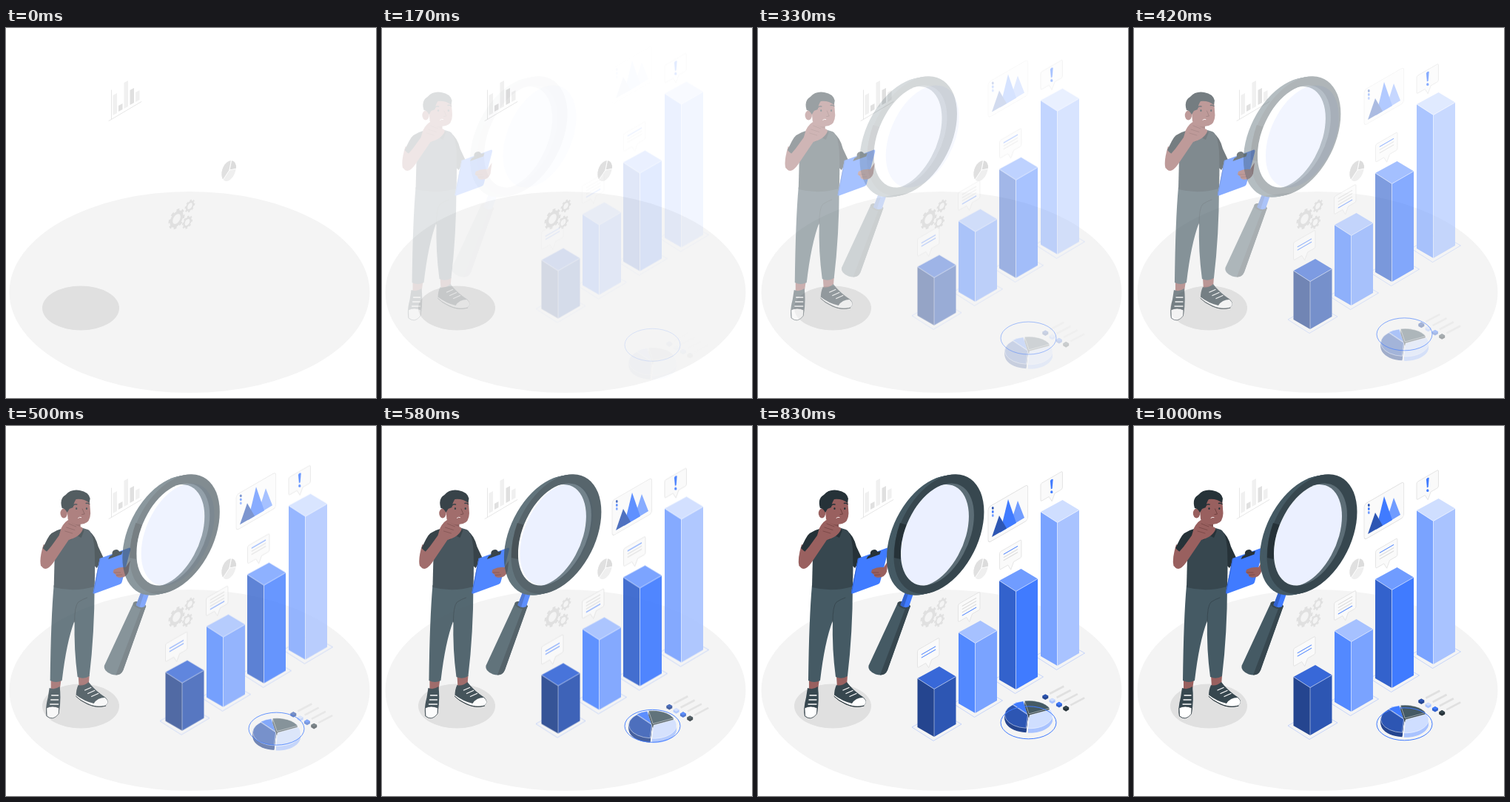
An HTML page for the animation above (1040 ms loop, 500 by 500 pixels).

```html
<!DOCTYPE html>
<html lang="en">
<head>
<meta charset="utf-8">
<title>Data analysis</title>
<style>
  html, body { margin: 0; width: 100%; height: 100%; overflow: hidden; background: #fff; }
  svg { display: block; width: 100%; height: 100%; }
</style>
</head>
<body>
<svg id="stage" viewBox="0 0 500 500"></svg>
<script>
const BLUE = '#407bff', NAVY = '#2d56b3', DEEP = '#25458f', PALE = '#cfdeff', SOFT = '#7aa3ff';
const SLATE = '#455a64', DARK = '#37474f', INK = '#263238', SKIN = '#99605f', SHADE = '#70413f', GREY = '#e0e0e0';

const path = (d, fill, extra = '') => `<path d="${d}" fill="${fill}" ${extra}/>`;
const poly = (points, fill, extra = '') => `<polygon points="${points}" fill="${fill}" ${extra}/>`;
const line = (d, color, width = 1) =>
  path(d, 'none', `stroke="${color}" stroke-width="${width}" stroke-linecap="round"`);
const oval = (cx, cy, rx, ry, fill, extra = '') =>
  `<ellipse cx="${cx}" cy="${cy}" rx="${rx}" ry="${ry}" fill="${fill}" ${extra}/>`;
// Places flat artwork on the isometric wall, with its top left corner at x, y.
const iso = (x, y, art) => `<g transform="matrix(.866 -.5 0 1 ${x} ${y})">${art}</g>`;

const gear = (x, y, r) => iso(x, y,
  `<g fill="none" stroke="${GREY}">
    <circle r="${r * .66}" stroke-width="${r * .34}"/>
    <circle r="${r * .9}" stroke-width="${r * .24}" pathLength="16" stroke-dasharray="1"/>
  </g>`);

function backdrop() {
  const icon = [[144.5, 91, 118, 0], [152, 105, 113, 1], [159.5, 74, 109, 0], [167.5, 84, 104, 1], [175, 87, 100, 0]]
    .map(([x, top, foot, strong]) =>
      poly([x, top, x + 5.5, top - 3, x + 5.5, foot - 3, x, foot], strong ? GREY : '#f0f0f0'));
  return oval(248, 357, 243.5, 136, '#f4f4f4') + oval(101, 378.5, 52, 30, GREY) +
    icon.join('') + line('M142.5 84V123M139 125.5L183 99.5', GREY, .8) +
    oval(301, 193, 8.8, 14.6, '#efefef', 'transform="rotate(20 301 193)"') +
    path('M301.5 192L304 179.5Q294 181 291.5 195Q291 202 293.5 205Z', GREY) +
    path('M302.5 192L305 179.5Q311.5 180 311 190Z', '#dcdcdc') +
    line('M293 205.5L302 192L304.5 179M302 192L311.5 190', '#fff', 1) +
    gear(230.5, 258, 12.5) + gear(248.5, 240.5, 7.8) + gear(245, 262.5, 8);
}

function bar(x, top, foot, left, right, cap) {
  const l = x - 22.5, r = x + 29.5;
  return poly([x - 30, foot - 13, x - 1, foot + 5.5, x + 37, foot - 17, x + 7, foot - 34], 'none',
      'stroke="#b4c8fb" stroke-width=".7"') +
    poly([l, top - 14.5, x, top, x, foot, l, foot - 13], left) +
    poly([x, top, r, top - 17, r, foot - 17, x, foot], right) +
    poly([l, top - 14.5, x + 7, top - 30.5, r, top - 17, x, top], cap) +
    path(`M${l} ${top - 14.5}L${x} ${top}L${r} ${top - 17}M${x} ${top}V${foot}`, 'none',
      'stroke="#fff" stroke-width=".7" opacity=".65"');
}

const bubble = (x, y, marks) => iso(x, y,
  path('M2 0H32Q34 0 34 2V22Q34 24 32 24H22L17.5 32.5L13 24H2Q0 24 0 22V2Q0 0 2 0Z', '#fafafa',
    `stroke="${GREY}" stroke-width=".8"`) + marks);
const rows = (top, colors) => colors.map((c, i) => line(`M6.5 ${top + i * 4.2}H28`, c, 1)).join('');

const bars = () =>
  bar(404.5, 128.5, 322, SOFT, '#a9c3ff', PALE) +
  bar(348.5, 221.5, 354, '#3362cc', BLUE, '#709cff') +
  bar(293.5, 291.5, 386, '#5389ff', SOFT, '#a6c1ff') +
  bar(238, 353.5, 418, DEEP, NAVY, '#3868d8') +
  bubble(215.5, 301, rows(9, [BLUE, BLUE])) +
  bubble(270.5, 239, rows(5.6, ['#d5d5d5', '#d5d5d5', '#d5d5d5', BLUE])) +
  bubble(326.5, 168.5, rows(6, [BLUE, '#d5d5d5', '#d5d5d5'])) +
  bubble(382, 76, '') +
  path('M394.9 72Q396.8 69 398.7 70L397.7 82.5L395.9 83.5Z', BLUE) + oval(396.8, 87.2, 1.6, 1.9, BLUE);

const panel = () =>
  iso(311, 106, `<rect width="62" height="48" rx="4" fill="#fafafa" stroke="${GREY}" stroke-width=".9"/>`) +
  poly('340,132 351,97 360,120', '#709cff') +
  poly('327,140 338,95 349,127', BLUE) +
  poly('316,146 326,117 336,134.5', NAVY) +
  [NAVY, BLUE, '#709cff'].map((c, i) => oval(317.3, 107 + i * 5, 1.4, 1.9, c)).join('');

function slice(from, to, face, side, dx, dy) {
  const at = deg => {
    const a = deg * Math.PI / 180;
    return `${365.5 + dx + 31 * Math.cos(a)} ${396 + dy + 18 * Math.sin(a)}`;
  };
  const d = `M${365.5 + dx} ${396 + dy}L${at(from)}A31 18 0 0 1 ${at(to)}Z`;
  let art = '';
  for (let z = 6; z > 0; z--) art += path(d, side, `transform="translate(0 ${z})"`);
  return art + path(d, face, 'stroke="#fff" stroke-width=".5"');
}

function pie() {
  const legend = [[DEEP, NAVY], ['#a9c3ff', PALE], ['#3362cc', BLUE], [INK, DARK]].map(([side, face], i) => {
    const x = 388.3 + i * 9.3, y = 372.8 + i * 5.2;
    return poly([x - 4, y - 2, x, y - 4.3, x + 4, y - 2, x + 4, y + 1, x, y + 3.3, x - 4, y + 1], side) +
      poly([x - 4, y - 2, x, y - 4.3, x + 4, y - 2, x, y + .2], face) +
      path(`M${x + 6} ${y - 5}l19 -10`, 'none', `stroke="${GREY}" stroke-width="2.7"`);
  });
  return slice(229, 259, BLUE, '#3362cc', -1, -.5) + slice(259, 335, SLATE, DARK, .6, -1) +
    slice(94, 229, NAVY, DEEP, -1, .3) + slice(-25, 94, PALE, '#a9c3ff', 1.5, .8) + legend.join('');
}

const person = () =>
  // ankles and shoes
  poly('67,342 81,342 79,356 67,357', SKIN) + poly('104,337 119,337 118,351 105,353', SKIN) +
  path('M65 354Q72 357 79 352Q81 370 78 388Q70 400 61 392Q59 382 63 367Z', DARK) +
  path('M61 381Q69 377 78 381L77.5 389Q70 399 61.5 392Z', '#fff', `stroke="${INK}" stroke-width=".7"`) +
  line('M68 364H77M67 370H77M66 376H77', '#fff', 1.3) +
  path('M104 350Q111 352 118 346Q126 357 141 367Q147 373 141 378Q129 382 117 376Q106 371 101 365Q101 356 104 350Z', DARK) +
  path('M101 363.5Q112 372 125 375Q130 367 140 367Q147 373 141 377.5Q129 381 117 375Q106 370 101 365Z', '#fff') +
  line('M101 365.5Q106 371 117 376Q129 381.5 141 378.3', INK, 1) +
  line('M113 357L121 353.5M117 361.5L126 357.5M122 365.5L131 361.5', '#fff', 1.3) +
  // trousers
  path('M71 215Q67 260 66 344Q74 348 82 344Q88 292 99 263Q98 302 103 339Q111 343 119 338Q126 280 126 215Z', SLATE) +
  line('M99 265Q99 243 104 238Q110 234 116 232', DARK, .9) +
  // far sleeve and shirt
  path('M117 141Q127 147 131 163L138 178L129 192L121 184Z', INK) +
  path('M92 137Q80 139 76 146L72 178L71 218Q98 225 126 217Q127 190 126 166Q124 143 117 140L107 137Z', DARK) +
  path('M92 130L107 128L107 139L101 149L92 141Z', '#84504f') +
  path('M91 136L101 148L94 154L86 142ZM106 137L102 148L108 151L112 141Z', INK) +
  // head
  path('M88 101L90 126Q96 136 112 132Q120 130 120.5 118L119 97Q104 92 88 101Z', SKIN) +
  oval(84.5, 118, 4.7, 6.5, SKIN) +
  path('M89 117Q86 111 82 111Q78 98 87 93Q94 85 106 87Q118 89 120 98L119 104Q112 98 101 99Q98 103 97 110L92 112Z', INK) +
  line('M97 107.5Q99 105 102 106M114.5 104.5Q117 103.5 119 105.5', INK, 1.5) +
  oval(101.5, 111.5, 1.1, 1.6, INK) + oval(115.3, 111.5, 1.1, 1.6, INK) +
  line('M109.5 112L112.5 119L109 119.5', SHADE, 1) +
  line('M104 124.3Q106 122.5 108 123.5', '#f3e6e6', 1) +
  // raised arm: upper arm, sleeve, then the forearm crossing in front
  path('M57 160Q51 180 53.5 189Q60 196 66 186L72 168Z', SKIN) +
  path('M81 139Q66 143 62 153L56 165Q62 172 73 175Q80 160 80 148Z', INK) +
  path('M54 184Q54 193 60 193Q65 192 70 185L91 154Q102 151 107 145Q112 139 109 137Q103 135 95 131Q97 126 93 126Q86 128 81 138L78 148Q68 163 56 176Z', SKIN) +
  line('M91 132L101 136M88 137L99 140.5M86 142L96 145', SHADE, .7) +
  // clipboard and hand
  path('M133 179L173 164.5Q175 164 174.5 167L163 211Q162.5 213 160 214L126 226.5Q123.5 227 124 224.5Z', BLUE) +
  line('M133.5 179L124.3 226', '#3362cc', 1) +
  path('M144.5 180L146.5 176L150 174Q149 169 153 167.5Q158 166 159.5 170L164 169L162.5 173.5Z', INK) +
  path('M152 194Q160 190 168 191L174 182L172 197Q169 206 158 204.5Q154 203 155 201L151 198Z', SKIN) +
  line('M153 198L161 198M156 201.5L163 201', SHADE, .7);

const disc = (matrix, fill) => `<circle r="1" transform="matrix(${matrix})" fill="${fill}"/>`;
const hole = (dx, dy, fill) => disc(`49.5 -26 0 64 ${238.5 + dx} ${146.5 + dy}`, fill);
const rim = (k, fill) => disc(`61 -30 0 75 ${231 + 9.5 * k} ${148 - 2 * k}`, fill);

const lens = () => hole(0, 0, '#ebf0ff');

const magnifier = () =>
  path('M184 241Q192 234 202 243L171 330Q167 339 155 335.5Q144 331 145.5 324Z', SLATE) +
  path('M195 247L202 243L171 330Q168 337 161 336.5Z', DARK) +
  oval(193, 242, 9, 4.6, DARK, 'transform="rotate(16 193 242)"') +
  path('M195 225L208 221L200 244Q194 247 188.5 242Z', BLUE) +
  path('M195 225L200 224L193 245L188.5 242Z', '#3362cc') +
  `<defs>
    <clipPath id="front">${hole(0, 0, '#000')}</clipPath>
    <mask id="opening" maskUnits="userSpaceOnUse" x="0" y="0" width="500" height="500">
      <rect width="500" height="500" fill="#fff"/>
      <g clip-path="url(#front)">${hole(-7, 1.5, '#000')}</g>
    </mask>
  </defs>
  <g mask="url(#opening)">
    ${[0, .25, .5, .75].map(k => rim(k, SLATE)).join('')}
    ${rim(1, DARK)}
    ${path('M188 131L198 134Q190 152 189 180L180 178Q180 153 188 131Z', INK)}
    ${hole(0, 0, '#5c6d76')}
  </g>`;

// Each layer: artwork, start offset, nesting depth for the fade, and remaining travel at progress y.
const once = y => 1 - y, twice = y => 2 * (1 - y), late = y => 2 - y - y * y;
const layers = [
  [bars, 0, -30, 1, once],
  [panel, 0, -30, 2, twice],
  [pie, 0, 30, 2, late],
  [() => oval(365.5, 402.8, 37.5, 22, 'none', `stroke="${BLUE}"`), 0, 30, 1, once],
  [person, -30, 0, 1, once],
  [lens, -30, 0, 1, once],
  [magnifier, -30, 0, 2, twice],
];

const stage = document.getElementById('stage');
stage.innerHTML = `<g>${backdrop()}</g>` + layers.map(([art]) => `<g class="layer">${art()}</g>`).join('');
const groups = stage.querySelectorAll('.layer');

const bezier = (s, a, b) => 3 * (1 - s) * (1 - s) * s * a + 3 * (1 - s) * s * s * b + s * s * s;
// Slow start with an overshoot before settling.
function ease(x) {
  let lo = 0, hi = 1;
  for (let i = 0; i < 24; i++) {
    const mid = (lo + hi) / 2;
    if (bezier(mid, .36, .5) < x) lo = mid; else hi = mid;
  }
  return bezier(lo, -.01, 1.38);
}

const LOOP = 1040, STEPS = 25;
function draw() {
  const t = performance.now() % LOOP;
  const step = Math.min(STEPS - 1, Math.floor(t / LOOP * STEPS + .15));
  const y = step < 2 ? 0 : ease(Math.min(1, (step + 1.1) / STEPS));
  layers.forEach(([, dx, dy, depth, travel], i) => {
    const left = travel(y);
    groups[i].setAttribute('transform', `translate(${dx * left} ${dy * left})`);
    groups[i].setAttribute('opacity', Math.max(0, Math.min(1, y)) ** depth);
  });
  requestAnimationFrame(draw);
}
draw();
</script>
</body>
</html>
```
